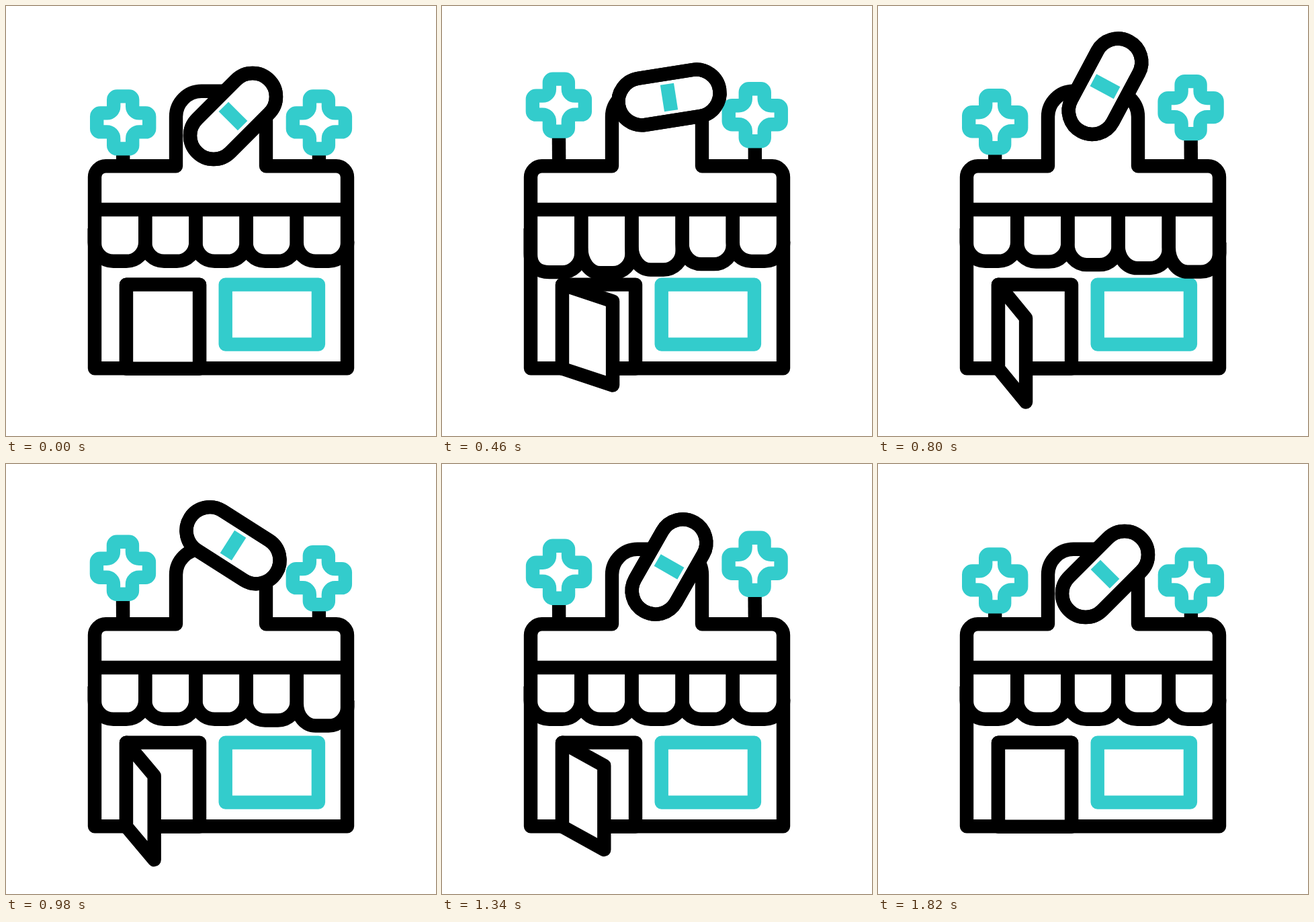
An HTML page with a canvas for the animation above (2400 ms loop, 640 by 640 pixels).

```html
<!DOCTYPE html>
<html lang="en">
<head>
<meta charset="utf-8">
<title>Pharmacy</title>
<style>
  html, body { margin: 0; width: 100%; height: 100%; overflow: hidden; background: #fff; }
  canvas { display: block; width: 640px; height: 640px; }
</style>
</head>
<body>
<canvas id="stage" width="640" height="640"></canvas>
<script>
const ctx = document.getElementById('stage').getContext('2d');
const LOOP = 2400, BLACK = '#000', TEAL = '#33cccc', WHITE = '#fff';
const clamp = x => Math.min(1, Math.max(0, x));

// Cubic-bezier easing with control points (a,0) and (b,1).
function bezier(a, b, x) {
  x = clamp(x);
  let lo = 0, hi = 1, s = 0.5;
  for (let i = 0; i < 24; i++) {
    s = (lo + hi) / 2;
    const at = 3 * s * (1 - s) * ((1 - s) * a + s * b) + s ** 3;
    if (at < x) lo = s; else hi = s;
  }
  return s * s * (3 - 2 * s);
}
const smooth = x => { x = clamp(x); return x * x * (3 - 2 * x); };
const strong = x => bezier(0.62, 0.38, x);

// One rise and fall, each lasting half, starting at time 0.
const bounce = (t, half) => smooth(t / half) - smooth(t / half - 1);

function draw(color, fill, trace) {
  ctx.beginPath();
  trace(ctx);
  if (fill) { ctx.fillStyle = fill; ctx.fill(); }
  ctx.strokeStyle = color;
  ctx.stroke();
}

function polygon(points, closed = true) {
  points.forEach(([x, y], i) => i ? ctx.lineTo(x, y) : ctx.moveTo(x, y));
  if (closed) ctx.closePath();
}

function building() {
  draw(BLACK, null, c => {
    c.moveTo(132, 539.3);
    c.arcTo(132, 238.3, 253, 238.3, 16.5);
    c.lineTo(253, 238.3);
    c.arcTo(253, 126.8, 320, 126.8, 38);
    c.arcTo(387, 126.8, 387, 238, 38);
    c.lineTo(387, 238.3);
    c.arcTo(508, 238.3, 508, 539, 16.5);
    c.lineTo(508, 539.3);
    c.closePath();
  });
  draw(BLACK, null, () => polygon([[132, 303], [508, 303]], false));
  draw(TEAL, null, c => c.rect(326.7, 414.6, 138.2, 89));
}

function awning(t) {
  const starts = [0, 100, 195, 315, 445], drops = [18.8, 17.5, 16, 13, 16];
  starts.forEach((start, i) => {
    const d = drops[i] * bounce(t - start, 375);
    const x = i ? 132 + 75.2 * i : 131.7;
    const right = i < 4 ? 132 + 75.2 * (i + 1) : 508.3;
    const left = 352 + d * (i ? 0.45 : 1), k = 15.5;
    draw(BLACK, null, c => {
      c.moveTo(x, i ? 303 : 331);
      c.lineTo(x, left);
      c.bezierCurveTo(x, left + k + d * 0.3, x + 28 - k, 379.8 + d, x + 28, 379.8 + d);
      c.lineTo(right - 28, 379.8 + d);
      c.arcTo(right, 379.8 + d, right, 352 + d, 28);
      c.lineTo(right, i < 4 ? 303 : 352);
    });
  });
}

function door(t) {
  const open = bezier(0.84, 0.3, t / 833) - bezier(0.9, 0.37, (t - 850) / 900);
  const x = 288 - 68 * open, dy = 50 * open;
  draw(BLACK, null, c => c.rect(179, 414.6, 109, 124.9));
  draw(BLACK, WHITE, () =>
    polygon([[179, 414.6], [x, 414.6 + dy], [x, 539.6 + dy], [179, 539.6]]));
}

function cross(x, t) {
  const rise = bounce(t, 378) + bounce(t - 756, 378);
  const y = 173.4 - 29.3 * rise, cx = x - 0.4 * rise;
  draw(BLACK, null, () => polygon([[x, 238], [cx, y + 39]], false));
  ctx.save();
  ctx.translate(cx, y);
  draw(TEAL, null, c => {
    c.moveTo(0, -39);
    for (let i = 0; i < 4; i++) {
      c.arcTo(14, -39, 14, -14, 5);
      c.arcTo(14, -14, 39, -14, 10);
      c.arcTo(39, -14, 39, 0, 5);
      c.lineTo(39, 0);
      c.rotate(Math.PI / 2);
    }
    c.closePath();
  });
  ctx.restore();
}

function pill(t) {
  const lift = strong(t / 833) - strong((t - 833) / 834);
  const turn = strong(t ? (t + 5) / 1670 : 0);
  ctx.save();
  ctx.translate(338, 164 - 44.3 * lift);
  ctx.rotate(Math.PI * (2 * turn - 0.25));
  const body = c => {
    c.arc(-41, 0, 35, Math.PI / 2, Math.PI * 1.5);
    c.arc(41, 0, 35, -Math.PI / 2, Math.PI / 2);
    c.closePath();
  };
  draw(BLACK, WHITE, body);
  draw(TEAL, null, () => polygon([[0, -20], [0, 20]], false));
  draw(BLACK, null, body);
  ctx.restore();
}

function frame(now) {
  const t = now % LOOP;
  ctx.fillStyle = WHITE;
  ctx.fillRect(0, 0, 640, 640);
  ctx.lineWidth = 20.4;
  ctx.lineJoin = 'round';
  ctx.lineCap = 'butt';
  cross(174.2, t);
  cross(465.9, t - 302);
  building();
  awning(t);
  door(t);
  pill(t);
}

let begin;
function tick(now) {
  begin ??= now;
  frame(now - begin);
  requestAnimationFrame(tick);
}
frame(0);
requestAnimationFrame(tick);
</script>
</body>
</html>
```
